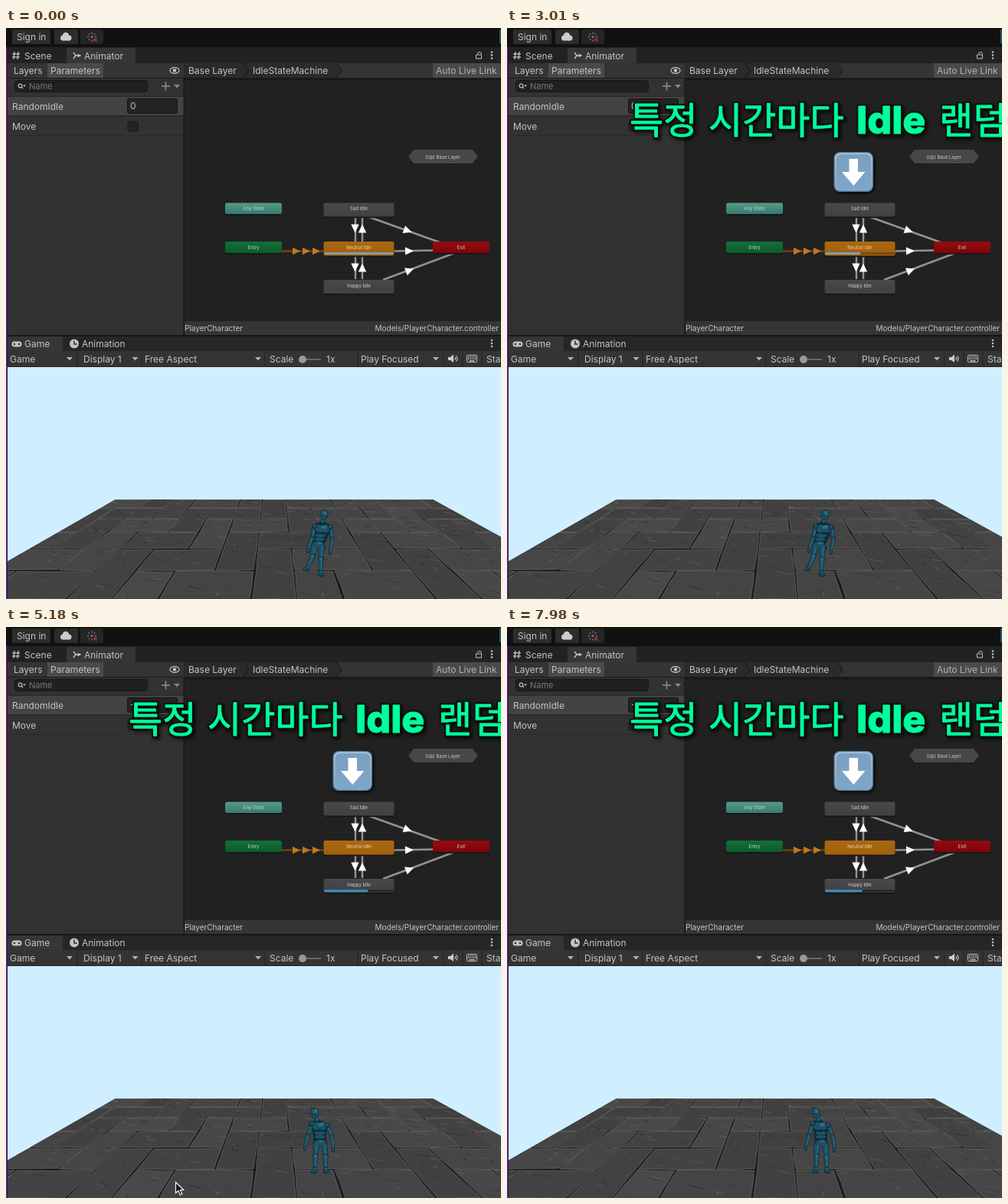
An HTML page with a canvas for the animation above (8000 ms loop, 646 px wide and 746 px high).

```html
<!DOCTYPE html>
<html lang="ko">
<head>
<meta charset="utf-8">
<title>Idle state machine</title>
<style>
html, body { margin: 0; width: 100%; height: 100%; overflow: hidden; background: #111; }
canvas { display: block; width: 646px; height: 746px; }
</style>
</head>
<body>
<canvas id="stage" width="646" height="746"></canvas>
<script>
const W = 646, H = 746, LOOP = 8000;
const stage = document.getElementById('stage').getContext('2d');
const TAU = Math.PI * 2;
const UI = 'Inter, Roboto, sans-serif';
let c = stage;

const clamp = v => Math.max(0, Math.min(1, v));
const ramp = (a, b, v) => clamp((v - a) / (b - a));
const smooth = (a, b, v) => { const p = ramp(a, b, v); return p * p * (3 - 2 * p); };
const hash = n => { const s = Math.sin(n * 127.1 + 3.7) * 43758.5453; return s - Math.floor(s); };

function box(x, y, w, h, fill, r = 0, line) {
  c.beginPath();
  c.roundRect(x, y, w, h, r);
  c.fillStyle = fill;
  c.fill();
  if (line) { c.strokeStyle = line; c.lineWidth = 1; c.stroke(); }
}
function text(s, x, y, size = 12, fill = '#c4c4c4', align = 'left') {
  c.font = `400 ${size}px ${UI}`;
  c.textAlign = align;
  c.fillStyle = fill;
  c.fillText(s, x, y);
}
function path(pts, close) {
  c.beginPath();
  pts.forEach(p => c.lineTo(p[0], p[1]));
  if (close) c.closePath();
}
function poly(pts, fill) { path(pts, true); c.fillStyle = fill; c.fill(); }
function line(pts, color, width = 1) {
  path(pts);
  c.strokeStyle = color;
  c.lineWidth = width;
  c.stroke();
}
function dot(x, y, rx, fill, ry = rx, turn = 0) {
  c.beginPath();
  c.ellipse(x, y, rx, ry, turn, 0, TAU);
  c.fillStyle = fill;
  c.fill();
}
function head(x, y, turn, fill = '#fff', r = 5.5) {
  c.save();
  c.translate(x, y);
  c.rotate(turn);
  poly([[-r, -r + .3], [r, 0], [-r, r - .3]], fill);
  c.restore();
}
function fade(y0, y1, ...colors) {
  const g = c.createLinearGradient(0, y0, 0, y1);
  colors.forEach((col, i) => g.addColorStop(i / (colors.length - 1), col));
  return g;
}
const caret = (x, y) => poly([[x - 4, y - 2], [x + 4, y - 2], [x, y + 2.5]], '#b0b0b0');
const kebab = (x, y) => [-4, 0, 4].forEach(d => dot(x, y + d, 1.3, '#c4c4c4'));

function topBars() {
  box(0, 0, W, 25, '#111');
  box(8, 2, 50, 19, '#2c2c2c', 2);
  text('Sign in', 14, 16);
  box(63, 2, 31, 19, '#2c2c2c', 2);
  dot(74.5, 13, 3.5, '#ccc'); dot(78, 10, 4.2, '#ccc'); dot(82, 13, 3.5, '#ccc');
  box(74.5, 12, 8, 4.5, '#ccc');
  box(97, 2, 30, 19, '#252525', 2);
  for (let i = 0; i < 8; i++) {
    const a = i * TAU / 8;
    dot(112 + 5 * Math.cos(a), 11.5 + 5 * Math.sin(a), .9, '#808080');
  }
  dot(112, 11.5, 1.6, '#777');
  line([[114.5, 13.5], [118.5, 17.5]], '#b0323c', 1.3);
  line([[118.5, 13.5], [114.5, 17.5]], '#b0323c', 1.3);
  box(644, 2, 2, 18, '#2f5866');

  box(0, 25, W, 21, '#222');
  box(79, 26, 90, 20, '#363636', 2);
  [[11, 31, 10, 41], [16, 31, 15, 41], [8, 34, 18, 34], [8, 38, 18, 38]]
    .forEach(l => line([[l[0], l[1]], [l[2], l[3]]], '#c4c4c4', 1.3));
  text('Scene', 24, 40.5);
  line([[88, 32], [91, 36], [97, 36]], '#c4c4c4', 1.4);
  line([[88, 40], [91, 36]], '#c4c4c4', 1.4);
  head(96, 36, 0, '#c4c4c4', 2.5);
  text('Animator', 102, 40.5);
  box(613.5, 35, 7, 5, '#222', 0, '#c4c4c4');
  c.beginPath(); c.arc(618, 34, 2.5, Math.PI, TAU); c.stroke();
  kebab(634, 35.5);

  box(0, 46, W, 20, '#343434');
  text('Layers', 10, 60);
  box(54, 46, 73, 19, '#4a4a4a');
  text('Parameters', 58, 60);
  c.beginPath();
  c.ellipse(220, 55.5, 6, 3.8, 0, 0, TAU);
  c.strokeStyle = '#c4c4c4'; c.lineWidth = 1.2; c.stroke();
  dot(220, 55.5, 2.2, '#c4c4c4');
  poly([[232, 46], [431, 46], [438, 55.5], [431, 65], [232, 65]], '#2b2b2b');
  [310, 431].forEach(x => line([[x, 46], [x + 7, 55.5], [x, 65]], '#1e1e1e', 1.3));
  text('Base Layer', 238, 60);
  text('IdleStateMachine', 322, 60);
  box(557, 46, 89, 19, '#4a4a4a');
  text('Auto Live Link', 561, 60, 12, '#b5b5b5');
  box(0, 65, W, 1, '#1c1c1c');
}

function params() {
  box(0, 66, 232, 336, '#323232');
  box(11.5, 68.5, 173, 15, '#202020', 4, '#161616');
  c.beginPath(); c.arc(18.5, 75.5, 2.3, 0, TAU);
  c.strokeStyle = '#bbb'; c.lineWidth = 1.2; c.stroke();
  line([[20, 77], [22, 79]], '#bbb', 1.3);
  poly([[22, 74.5], [26, 74.5], [24, 77]], '#bbb');
  text('Name', 30, 80, 11, '#777');
  line([[203, 76], [214, 76]], '#888', 1.7);
  line([[208.5, 70.5], [208.5, 81.5]], '#888', 1.7);
  poly([[219, 74], [227, 74], [223, 78.5]], '#888');
  box(0, 89, 232, 1, '#292929');
  box(0, 90, 232, 24, '#434343');
  box(0, 114, 232, 2, '#2a2a2a');
  text('RandomIdle', 8, 107);
  box(158.5, 92.5, 65, 19, '#242424', 2, '#141414');
  text('Move', 8, 133);
  box(159, 122, 13.5, 13, '#242424', 2, '#1a1a1a');
  box(0, 140, 232, 1, '#292929');
  box(231.5, 66, 1.5, 336, '#191919');
}

function node(label, x, y, w, h, top, bottom, ink = '#d0d0d0') {
  box(x, y + 1, w, h + .8, '#161616', 2.5);
  box(x, y, w, h, fade(y, y + h, top, bottom), 2.5);
  text(label, x + w / 2, y + 9.5, 6, ink, 'center');
}

function graph() {
  box(233, 66, 413, 317, '#212121');
  box(233, 66, 413, 4, fade(66, 70, '#161616', '#212121'));

  const wire = '#929292';
  for (const [a, b] of [[246, 279], [298, 328]]) {
    for (const x of [456, 465]) line([[x, a], [x, b]], wire, 2.5);
  }
  line([[474, 247], [566, 280]], wire, 2.5);
  line([[506, 291.5], [558, 290.5]], wire, 2.5);
  line([[492, 329], [588, 293]], wire, 2.5);
  line([[360, 291.5], [415, 291.5]], '#6d4315', 2.5);
  [379, 392, 405].forEach(x => head(x, 291.5, 0, '#c0771f', 5));

  poly([[525, 168.5], [532, 159], [609, 159], [616, 168.5], [609, 178], [532, 178]], '#171717');
  poly([[525, 168], [532, 159], [609, 159], [616, 168], [609, 177], [532, 177]], '#464748');
  text('(Up) Base Layer', 570, 170.5, 6, '#ccc', 'center');
  node('Any State', 286, 228.5, 74, 14.5, '#579a8a', '#357a6c');
  node('Entry', 286, 279, 74, 15, '#12703a', '#0a5c28');
  node('Sad Idle', 414.5, 228.5, 92, 18, '#49494b', '#414143');
  node('Neutral Idle', 414.5, 279, 92, 18.5, '#ac6811', '#a0600d', '#ecd2aa');
  node('Happy Idle', 414.5, 329, 92, 18, '#49494b', '#414143');
  node('Exit', 557, 279, 74, 15, '#980b10', '#7c0508');

  box(233, 383, 413, 19, '#353535');
  text('PlayerCharacter', 233, 396, 10);
  text('Models/PlayerCharacter.controller', 643, 396, 10, '#c4c4c4', 'right');
}

function gameBars() {
  box(0, 401, W, 2, '#161616');
  box(0, 403, W, 19, '#262626');
  box(1, 403, 73, 19, '#363636', 2);
  box(7.5, 409.5, 13, 7, '#c4c4c4', 3.5);
  dot(11, 413, 1.3, '#333'); dot(17, 413, 1.3, '#333');
  text('Game', 24, 417);
  dot(89, 412.5, 6, '#c4c4c4');
  line([[89, 408.5], [89, 413], [92.5, 413]], '#262626', 1.4);
  text('Animation', 99, 417);
  kebab(634, 412);

  box(0, 422, W, 21, '#343434');
  box(0, 442, W, 1, '#222');
  [93, 177, 338, 459.5, 571, 596, 621].forEach(x => box(x - .5, 422, 1, 20, '#222'));
  text('Game', 5, 436.5);
  text('Display 1', 101, 436.5);
  text('Free Aspect', 181, 436.5);
  text('Scale', 344, 436.5);
  text('1x', 418, 436.5);
  text('Play Focused', 463, 436.5);
  text('Sta', 627, 436.5);
  [83, 168.5, 329, 561].forEach(x => caret(x, 432));
  line([[388, 433], [411, 433]], '#686868', 2);
  dot(387, 433, 5, '#999');
  poly([[577, 430], [580, 430], [584, 426.5], [584, 437], [580, 434], [577, 434]], '#ccc');
  c.strokeStyle = '#ccc'; c.lineWidth = 1.1;
  [2.5, 5].forEach(r => { c.beginPath(); c.arc(584, 432, r, -.8, .8); c.stroke(); });
  box(601.5, 427.5, 13, 9, '#343434', 1, '#c4c4c4');
  for (let i = 0; i < 8; i++) box(603 + i % 4 * 2.8, 429 + (i >> 2) * 2.5, 1.6, 1.4, '#c4c4c4');
  box(604.5, 434, 7, 1.3, '#c4c4c4');
}

// Ground plane with its horizon at y 494: a runs across, b towards the viewer.
function ground(a, b) {
  const s = 1 / (.0082 - b * .00071);
  return [350 + (a - .5) * .24 * s, 494 + s];
}
function brick(a, b, w, h) {
  const seed = a * 31.7 + b * 17.3;
  const g = .03, l = a + g, r = a + w - g, t = b + g, d = b + h - g;
  const jog = k => (hash(seed + k) - .5) * .06;
  const edge = [[l, t + jog(1)], [l + w * .5, t + jog(2)], [r, t + jog(3)], [r + jog(4), b + h / 2],
    [r, d + jog(5)], [l + w * .5, d + jog(6)], [l, d], [l + jog(7), b + h / 2]]
    .map(p => ground(p[0], p[1]));
  const v = 63 + Math.round(hash(seed) * 10);
  poly(edge, `rgb(${v},${v},${v})`);
  path(edge, true);
  c.strokeStyle = 'rgba(135,135,135,.5)'; c.lineWidth = .9; c.stroke();
  for (let k = 0; k < 5; k++) {
    const x = l + hash(seed + k + 20) * w * .75, y = t + hash(seed + k + 30) * h * .8;
    const q = hash(seed + k + 40) * .35;
    line([ground(x, y), ground(x + q * .6, y + .08), ground(x + q, y + q * .5 - .05)],
      k % 2 ? 'rgba(150,150,150,.28)' : 'rgba(20,20,20,.3)', .9);
  }
}
function scene() {
  box(0, 443, W, 303, '#cfeeff');
  c.save();
  path([[143, 616], [557, 616], [W, 665], [W, H], [0, H], [0, 698]], true);
  c.clip();
  box(0, 615, W, 131, '#1c1c1c');
  for (let b = -1; b < 7; b++) {
    for (let a = -12; a < 13; a++) {
      const k = ((a - b - 1) % 4 + 4) % 4;
      if (k === 0) brick(a, b, 2, 1);
      if (k === 3) brick(a, b, 1, 2);
    }
  }
  c.restore();
}

const still = document.createElement('canvas');
still.width = W;
still.height = H;
c = still.getContext('2d');
topBars(); params(); graph(); gameBars(); scene();
box(0, 25, 1, H - 25, fade(25, H, '#8a1fa8', '#6f35c8'));
box(1, 25, 1, H - 25, '#2b1236');
c = stage;

// Joints: head, neck, shoulders, elbows, hands, hips, knees, feet (left then right).
const NEUTRAL = [[415, 636], [413, 645], [403, 651], [423, 652], [399, 666], [426, 667], [394, 681], [423, 683],
  [403, 675], [412, 676], [400, 690], [411, 694], [393, 706], [410, 713]];
const CALM = [[410, 635], [410, 644], [401, 650], [420, 650], [397, 664], [424, 664], [395, 679], [424, 680],
  [405, 675], [415, 675], [403, 692], [415, 693], [402, 711], [416, 712]];
const LEAN = [[403, 635], [406, 644], [399, 649], [419, 651], [394, 664], [425, 665], [390, 679], [427, 681],
  [405, 674], [415, 674], [404, 691], [417, 692], [403, 710], [417, 710]];
const mix = (p, q, k) => p.map((v, i) => [v[0] + (q[i][0] - v[0]) * k, v[1] + (q[i][1] - v[1]) * k]);

const SKIN = '#1d5266', DARK = '#0e2c37', LIT = '#2e6f86';

function limb(p, q, w0, w1) {
  const a = Math.atan2(q[1] - p[1], q[0] - p[0]);
  const nx = -Math.sin(a), ny = Math.cos(a);
  const tube = (grow, fill) => {
    const r = w0 + grow, s = w1 + grow;
    poly([[p[0] + nx * r, p[1] + ny * r], [q[0] + nx * s, q[1] + ny * s],
      [q[0] - nx * s, q[1] - ny * s], [p[0] - nx * r, p[1] - ny * r]], fill);
    dot(p[0], p[1], r, fill);
    dot(q[0], q[1], s, fill);
  };
  tube(.7, DARK);
  tube(0, SKIN);
  line([[p[0] + .8, p[1] + 1], [q[0] + .8, q[1] - 1]], LIT, 1.1);
}

function figure(j) {
  const [top, neck, shL, shR, elL, elR, haL, haR, hipL, hipR, knL, knR, ftL, ftR] = j;
  for (const [hip, knee, foot, side] of [[hipL, knL, ftL, -1], [hipR, knR, ftR, 1]]) {
    dot(foot[0] + side, foot[1] + 1, 4.2, DARK, 3);
    dot(foot[0] + side, foot[1] + .5, 3.3, SKIN, 2.2);
    limb(hip, knee, 3.8, 2.6);
    limb(knee, foot, 2.8, 1.6);
    dot(knee[0], knee[1], 1.8, LIT);
    dot(foot[0], foot[1] - 4, 2, DARK, .8);
  }
  for (const [s, e, h] of [[shL, elL, haL], [shR, elR, haR]]) {
    limb(s, e, 2.5, 1.8);
    limb(e, h, 2, 1.2);
    dot(h[0], h[1] + 2, 2, DARK, 3.2);
    dot(h[0], h[1] + 1.5, 1.3, SKIN, 2.4);
  }
  const mx = (hipL[0] + hipR[0]) / 2, my = hipL[1];
  poly([[shL[0] - 2, shL[1] - 2], [neck[0], neck[1] - 1], [shR[0] + 2, shR[1] - 2],
    [shR[0] - 1, shR[1] + 9], [hipR[0] + 3, my + 1], [mx, my + 5], [hipL[0] - 3, my + 1], [shL[0] + 1, shL[1] + 9]], DARK);
  const cx = (shL[0] + shR[0]) / 2, cy = shL[1];
  dot(cx - 4, cy + 3, 5.4, SKIN, 5.2);
  dot(cx + 4.3, cy + 3, 5.4, SKIN, 5.2);
  dot(cx + 2, cy + 1, 3.6, LIT, 2.2);
  [[12, 7, 2.8], [17, 6.5, 2.3]].forEach(([d, rx, ry]) => dot(cx + (mx - cx) * d / 24, cy + d, rx, SKIN, ry));
  dot(mx, my, 7.2, SKIN, 4);
  dot(mx + 2, my - 2, 3.5, LIT, 1);
  line([[cx - 8, cy + 8], [cx, cy + 10], [cx + 8, cy + 8]], DARK, 1.3);
  for (const s of [shL, shR]) { dot(s[0], s[1], 3.2, DARK); dot(s[0], s[1] - .3, 2.4, SKIN); }
  limb(neck, top, 1.8, 1.8);
  const tilt = (top[0] - neck[0]) * .1;
  dot(top[0], top[1], 5.4, DARK, 7, tilt);
  dot(top[0], top[1], 4.6, SKIN, 6.2, tilt);
  dot(top[0] + 1.2, top[1] - 2.5, 2.2, LIT, 2.2);
  line([[top[0] - 4, top[1] + 1], [top[0] + 3, top[1] + 3]], DARK, 1);
}

function arrowTile() {
  c.save();
  c.shadowColor = 'rgba(0,0,0,.8)';
  c.shadowBlur = 4;
  c.shadowOffsetX = c.shadowOffsetY = 2;
  box(426.5, 162, 51.5, 52, '#5f819f', 8);
  c.restore();
  box(428, 163.5, 48.5, 49, fade(163, 213, '#b5cfe2', '#83a9ca'), 7);
  box(429.5, 165, 45.5, 46, fade(165, 211, '#7a9fc0', '#7fa5c8'), 6);
  poly([[446.5, 171], [458, 171], [458, 188], [467.5, 188], [452.3, 206], [437, 188], [446.5, 188]], '#fff');
}

function title() {
  const words = [['특정', 160], ['시간마다', 263], ['Idle', 456], ['랜덤', 564]];
  const each = paint => words.forEach(([s, x]) => {
    c.font = s === 'Idle' ? `800 50px ${UI}` : '500 48px "Noto Sans CJK KR", "Noto Sans CJK", sans-serif';
    paint(s, x);
  });
  const outline = (color, width) => {
    c.strokeStyle = color;
    c.lineWidth = width;
    each((s, x) => c.strokeText(s, x, 137.5));
  };
  c.save();
  c.textAlign = 'left';
  c.lineJoin = 'round';
  c.shadowColor = 'rgba(0,0,0,.8)';
  c.shadowBlur = 4;
  c.shadowOffsetX = c.shadowOffsetY = 2;
  outline('#0b0f0d', 5);
  c.shadowColor = 'transparent';
  outline('#00ff9c', .9);
  c.fillStyle = '#00ff9c';
  each((s, x) => c.fillText(s, x, 137.5));
  c.restore();
}

const SHOW = 350, SWITCH = 3240, BACK = 6080, AGAIN = 6340, BLEND = 250;
const NEUTRAL_MS = 5900, HAPPY_MS = 3090;

function bar(y, p, fill, track) {
  box(415.5, y, 90, 3, track);
  box(415.5, y, 90 * p, 3, fill);
}

function states(t) {
  const happyOn = t >= SWITCH;
  const toHappy = t >= AGAIN ? ramp(AGAIN, AGAIN + BLEND, t) : ramp(SWITCH, SWITCH + BLEND, t);
  const toNeutral = t < AGAIN ? ramp(BACK, BACK + BLEND, t) : 0;
  const start = t >= BACK ? BACK : 20;
  if (toHappy < 1 || toNeutral > 0) {
    const p = ((t - start) / NEUTRAL_MS + 1) % 1;
    bar(293, p, '#7d9fb0', '#7c4a0b');
  }
  const phase = happyOn ? (t - (t >= AGAIN ? AGAIN : SWITCH)) / HAPPY_MS % 1 : 0;
  if (happyOn) bar(343.2, phase, '#3c8fc2', '#232a2f');
  if (toNeutral > 0) line([[465, 328], [465, 328 - 30 * toNeutral]], '#3c8fc2', 6);
  else if (toHappy > 0 && toHappy < 1) line([[456, 298], [456, 298 + 30 * toHappy]], '#3c8fc2', 6);
  for (const y of [262, 313]) {
    head(455.5, y, Math.PI / 2);
    head(465, y, -Math.PI / 2);
  }
  head(524.5, 265, .34);
  head(526.5, 291.3, -.02);
  head(527, 316.5, -.36);

  const weight = toHappy * (1 - toNeutral);
  const sway = smooth(.3, .5, phase) * (1 - smooth(.66, .95, phase));
  const breath = Math.sin(t / NEUTRAL_MS * TAU * 2) * .6;
  const calm = NEUTRAL.map((p, i) => i < 8 ? [p[0] + breath * .5, p[1] + breath * .4] : p);
  return mix(calm, mix(CALM, LEAN, sway), weight);
}

function cursor(x, y) {
  const shape = [[0, 0], [0, 14], [3.4, 11], [5.8, 16.5], [8.3, 15.3], [6, 10], [10.2, 10]]
    .map(p => [x + p[0], y + p[1]]);
  poly(shape, '#111');
  path(shape, true);
  c.strokeStyle = '#f4f4f4'; c.lineWidth = 1.2; c.stroke();
}

function draw(t) {
  c.drawImage(still, 0, 0);
  text(t < SWITCH ? '0' : '-1', 162, 106);
  figure(states(t));
  if (t >= SHOW) { arrowTile(); title(); }
  if (t >= SWITCH && t < 6020) cursor(221.5, 725.5);
}

const began = performance.now();
function tick() {
  draw((performance.now() - began) % LOOP);
  requestAnimationFrame(tick);
}
tick();
</script>
</body>
</html>
```
